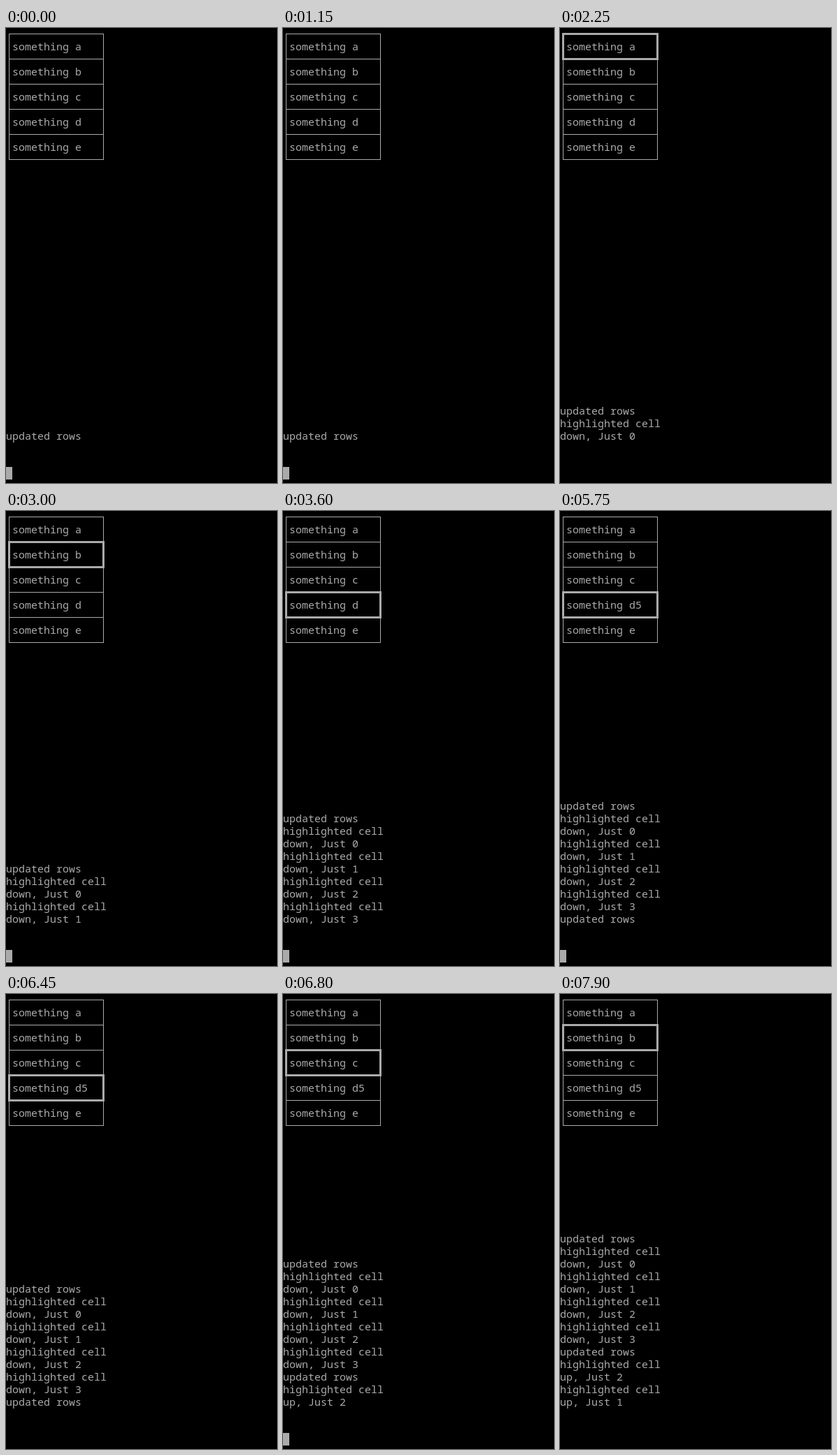
Animation, 388 px wide and 652 px high, one loop 8000 ms. Source, as an HTML page:

```html
<!DOCTYPE html>
<html lang="en">
<head>
<meta charset="utf-8">
<title>Table editor in a terminal</title>
<style>
  html, body { margin: 0; width: 100%; height: 100%; overflow: hidden; background: #000; }
  svg { display: block; }
  text {
    font: 15px "Noto Sans Mono", "DejaVu Sans Mono", monospace;
    fill: #aaa;
    white-space: pre;
  }
  rect { shape-rendering: crispEdges; fill: none; stroke: #aaa; }
  .solid { fill: #aaa; stroke: none; }
</style>
</head>
<body>
<svg id="stage" width="388" height="652" viewBox="0 0 388 652"></svg>
<script>
const LOOP = 8000, COL = 9, ROW = 18, LAST_LOG_ROW = 32;
const stage = document.getElementById("stage");

function add(tag, attrs, parent = stage) {
  const el = document.createElementNS("http://www.w3.org/2000/svg", tag);
  for (const k in attrs) el.setAttribute(k, attrs[k]);
  parent.appendChild(el);
  return el;
}

const baseline = row => row * ROW + 14;

function label(col, row, str = "", parent = stage) {
  const el = add("text", { x: col * COL, y: baseline(row) }, parent);
  el.textContent = str;
  return el;
}

// Border running through the centres of character cells
function frame(col, row, cols, rows, weight, parent = stage) {
  return add("rect", {
    x: col * COL + 4.5, y: row * ROW + 8.5,
    width: cols * COL, height: rows * ROW, "stroke-width": weight
  }, parent);
}

function setText(el, str) {
  if (el.textContent !== str) el.textContent = str;
}

function show(el, on) {
  el.setAttribute("visibility", on ? "visible" : "hidden");
}

// Latest value in a list of [time, value] steps
function at(steps, t) {
  let value = steps[0][1];
  for (const [time, v] of steps) if (t >= time) value = v;
  return value;
}

const selected = [[0, -1], [1550, 0], [2700, 1], [3150, 2], [3550, 3], [6800, 2], [7200, 1]];
const cursorOn = [[0, 1], [600, 0], [1150, 1], [2250, 0], [2700, 1], [5500, 0],
                  [5700, 1], [6450, 0], [6800, 1], [7900, 0]];
const editOpen = [[0, 0], [4050, 1], [5700, 0]];
const TYPED = 4800, SAVED = 5700;

const move = (time, dir, i, gap = 0) =>
  [[time, "highlighted cell"], [time + gap, `${dir}, Just ${i}`]];
const messages = [
  [0, "updated rows"],
  ...move(1550, "down", 0, 50),
  ...move(2700, "down", 1),
  ...move(3150, "down", 2),
  ...move(3550, "down", 3),
  [SAVED, "updated rows"],
  ...move(6800, "up", 2),
  ...move(7200, "up", 1)
];

const cells = [..."abcde"].map((c, i) => {
  frame(0, i * 2, 15, 2, 1);
  return label(1, i * 2 + 1, "something " + c);
});
const highlight = frame(0, 0, 15, 2, 3);

const dialog = add("g", {});
frame(18, 0, 17, 3, 1, dialog);
label(19, 1, "edit cell value:", dialog);
const input = label(19, 2, "", dialog);

const log = messages.map(([, str]) => label(0, LAST_LOG_ROW, str));
const cursor = add("rect", { class: "solid", x: 0, y: 629, width: COL, height: ROW });

function render(t) {
  const sel = at(selected, t);
  show(highlight, sel >= 0);
  highlight.setAttribute("y", Math.max(sel, 0) * 2 * ROW + 8.5);

  setText(cells[3], t < SAVED ? "something d" : "something d5");
  show(dialog, at(editOpen, t));
  setText(input, t < TYPED ? "something d" : "something d5");

  const count = messages.filter(([time]) => t >= time).length;
  log.forEach((el, i) => {
    show(el, i < count);
    el.setAttribute("y", baseline(LAST_LOG_ROW - (count - 1 - i)));
  });
  show(cursor, at(cursorOn, t));
}

const start = performance.now();
function tick() {
  render((performance.now() - start) % LOOP);
  requestAnimationFrame(tick);
}
tick();
</script>
</body>
</html>
```
